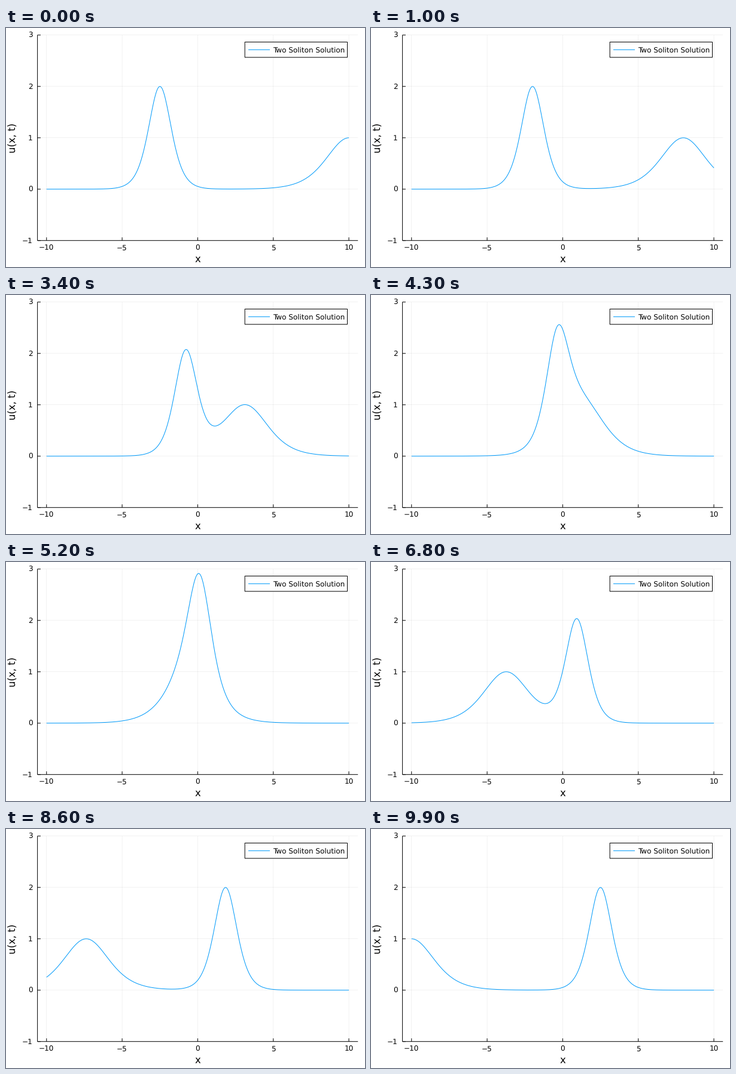
A matplotlib script that plays this animation: 600 by 400 pixels, repeating every 10000 ms.

```python
import numpy as np
import matplotlib.pyplot as plt
from matplotlib.animation import FuncAnimation
from matplotlib.patches import Rectangle

W, H, DPI = 600, 400, 100
FRAMES = 100
PT = 72 / DPI  # points per pixel
BLUE = "#009AFA"
LEFT, RIGHT, TOP, BOTTOM = 52.6, 588.2, 11.8, 355.7

plt.rcParams["font.family"] = "DejaVu Sans"
plt.rcParams["text.hinting"] = "none"
plt.rcParams["lines.solid_capstyle"] = "butt"

fig = plt.figure(figsize=(W / DPI, H / DPI), dpi=DPI, facecolor="white")
ax = fig.add_axes([0, 0, 1, 1])
ax.set_xlim(0, W)
ax.set_ylim(H, 0)
ax.axis("off")


def px(x):
    return LEFT + (x + 10.6) / 21.2 * (RIGHT - LEFT)


def py(u):
    return BOTTOM - (u + 1) / 4 * (BOTTOM - TOP)


def line(xs, ys, color="black", width=1.0, **kw):
    return ax.plot(xs, ys, color=color, lw=width * PT, snap=False, **kw)[0]


def label(x, y, text, size=12, va="baseline", **kw):
    return ax.text(x, y, text, fontsize=size * PT, color="black", va=va, **kw)


def minus(n):
    return str(n).replace("-", "\u2212")


def sech2(z):
    return 1 / np.cosh(z) ** 2


def wave(x, t):
    return 2 * sech2(x - t / 2) + sech2((x + 2 * t) / 2)


x_ticks = range(-10, 11, 5)
y_ticks = range(-1, 4)

# Grid
for v in x_ticks:
    line([px(v)] * 2, [TOP, BOTTOM], width=0.5, alpha=0.1, zorder=1)
for v in y_ticks:
    line([LEFT, RIGHT], [py(v)] * 2, width=0.5, alpha=0.1, zorder=1)

# Axes, ticks and tick labels
line([LEFT, RIGHT], [BOTTOM] * 2, zorder=2)
line([LEFT] * 2, [TOP, BOTTOM], zorder=2)
for v in x_ticks:
    line([px(v)] * 2, [BOTTOM, BOTTOM - 5.3], zorder=2)
    label(px(v), 371.7, minus(v), ha="center")
for v in y_ticks:
    line([LEFT, LEFT + 5.3], [py(v)] * 2, zorder=2)
    label(44.4, py(v) + 4.4, minus(v), ha="right")

label(px(0), 391.5, "x", 16.5, ha="center")
label(16.5, (TOP + BOTTOM) / 2, "u(x, t)", 16.5, rotation=90,
      rotation_mode="anchor", ha="center")

# Curve
x = np.linspace(-10, 10, 401)
curve = line(px(x), py(wave(x, -5)), BLUE, zorder=3)

# Legend
ax.add_patch(Rectangle((399.2, 23.5), 171.3, 25.6, fc="white", ec="black",
                       lw=PT, snap=False, zorder=4))
line([405, 441], [36.4] * 2, BLUE, zorder=5)
label(445.6, 40.8, "Two Soliton Solution", ha="left", zorder=5)


def update(i):
    t = -5 + 10 * i / (FRAMES - 1)
    curve.set_ydata(py(wave(x, t)))
    return [curve]


anim = FuncAnimation(fig, update, frames=FRAMES, interval=100,
                     repeat=True, repeat_delay=0, blit=False)
plt.show()
```
